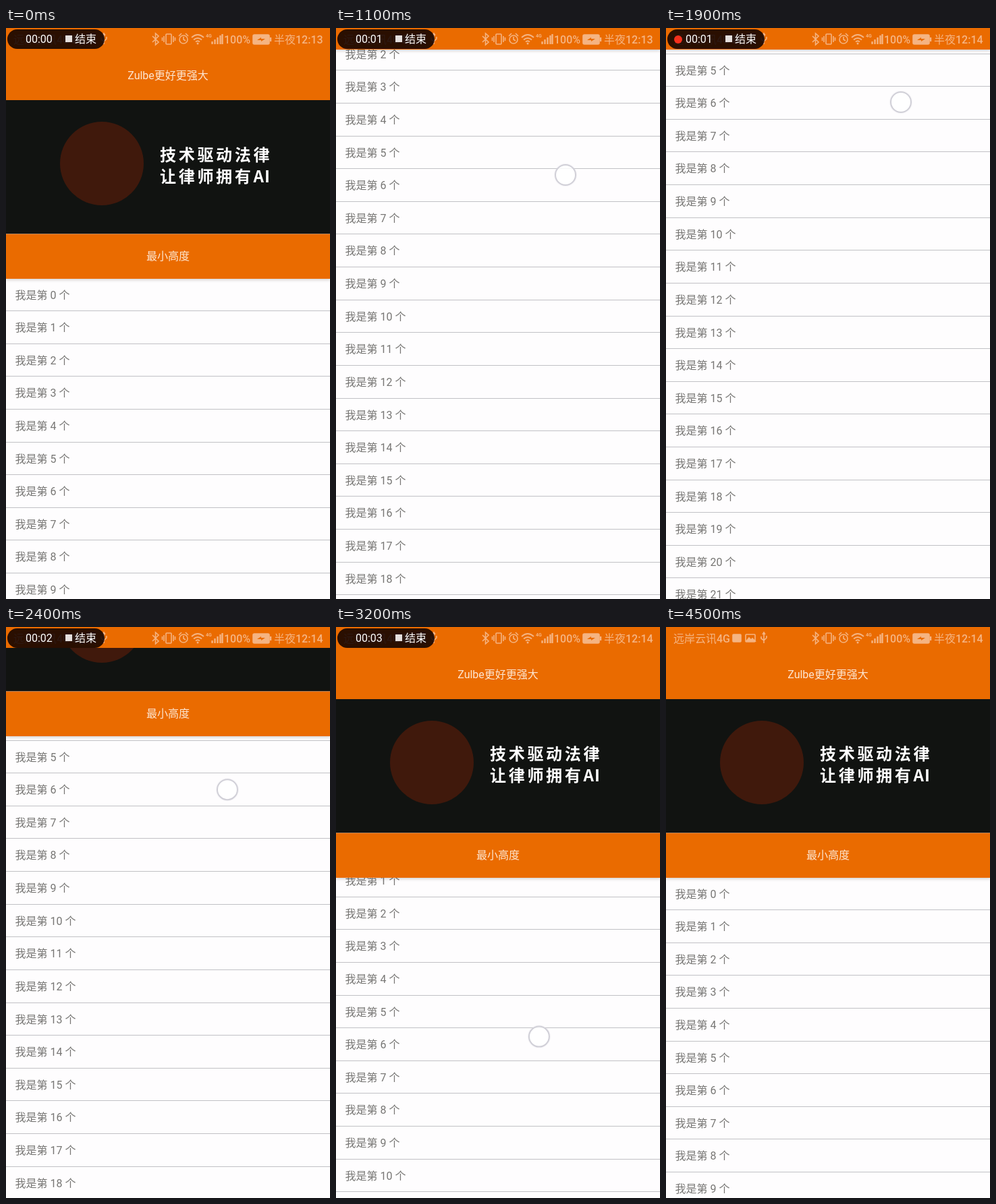
Animation of 480x847 px, one loop 4.6 s. Source, as an HTML page:

```html
<!DOCTYPE html>
<html lang="zh-CN">
<head>
<meta charset="utf-8">
<title>Scrolling header</title>
<style>
  html, body { margin: 0; width: 100%; height: 100%; overflow: hidden; background: #fefdfe; }
  body { font: 16px Roboto, "Noto Sans CJK SC", "Noto Sans CJK", sans-serif; }
  #stage { position: relative; width: 480px; height: 847px; overflow: hidden; background: #fefdfe; }
  #stage > * { position: absolute; left: 0; top: 0; }

  #list { top: 371.6px; width: 480px; }
  .row {
    box-sizing: border-box; height: 48.62px; padding-left: 13.5px;
    border-bottom: 1px solid #c1c1c5; color: #777674; line-height: 50px; white-space: pre;
  }

  #header { width: 480px; height: 372px; background: #ea6b00; box-shadow: 0 2px 4px rgba(0, 0, 0, .17); }
  .label { position: absolute; width: 100%; text-align: center; line-height: 24px; color: #fde6d2; }
  .banner { position: absolute; top: 107px; width: 100%; height: 198px; background: #111311; border-bottom: 1px solid #b9835a; }
  .disc { position: absolute; left: 80px; top: 32px; width: 124px; height: 124px; border-radius: 50%; background: #40190c; }
  .slogan {
    position: absolute; left: 228px; top: 64px; white-space: pre; color: #fff;
    font: 700 24px/31.5px "Noto Sans CJK SC", "Noto Sans CJK", sans-serif; letter-spacing: 3.7px;
  }
  .slogan span { letter-spacing: 1px; }

  #status { width: 480px; height: 31px; background: #ea6b00; color: #f5b482; }
  #status text { font-size: 16px; font-weight: 500; fill: currentColor; }
  #status .tiny { font-size: 7px; font-weight: 700; }

  #pill {
    left: 2px; top: 2px; width: 144px; height: 29px; border-radius: 15px;
    background: rgba(14, 2, 2, .87); color: #fff; line-height: 30px;
  }
  #pill * { position: absolute; white-space: nowrap; }
  #dot { left: 10px; top: 9px; width: 12px; height: 12px; border-radius: 50%; background: #f5301c; }
  #timer { left: 27px; }
  #stop { left: 86px; top: 9px; width: 10px; height: 10px; background: #e4dfdd; }
  #end { left: 100px; }

  #touch {
    box-sizing: border-box; width: 32px; height: 32px; margin: -16px; border-radius: 50%;
    border: 2px solid #d0cfd7; background: rgba(255, 255, 255, .85); box-shadow: 0 0 2px #dddce2;
  }
</style>
</head>
<body>
<div id="stage">
  <div id="list"></div>
  <div id="header">
    <div class="label" style="top:58.5px">Zulbe更好更强大</div>
    <div class="banner">
      <div class="disc"></div>
      <div class="slogan">技术驱动法律
让律师拥有<span>AI</span></div>
    </div>
    <div class="label" style="top:327px">最小高度</div>
  </div>
  <div id="status">
    <svg width="480" height="31" fill="none" stroke="currentColor" stroke-width="1.6">
      <g stroke="none">
        <text x="11" y="22.5">远岸云讯4G</text>
        <text class="tiny" x="296" y="14">4G</text>
        <text x="323" y="23">100%</text>
        <text id="clock" x="397" y="22.5"></text>
      </g>
      <rect x="99" y="11" width="12" height="11" rx="1" fill="currentColor"/>
      <rect x="118" y="11" width="14" height="11" rx="1"/>
      <path d="M119 21l4-5 3 3 2-2 4 4z" fill="currentColor"/>
      <path d="M145 9v15M141 14v3l4 3 4-4v-3M143 11l2-3 2 3"/>
      <path d="M217 12l9 9-4.500 4V8l4.500 4-9 9"/>
      <rect x="237" y="9" width="8" height="15" rx="1"/>
      <path d="M234 12v9M248 12v9M231.500 14v5M250.500 14v5"/>
      <circle cx="263" cy="17" r="6"/>
      <path d="M263 13v4l3 2M256 12l4-4M270 12l-4-4"/>
      <path d="M275 14q9-8 18 0M278 17.500q6-5 12 0M281 20.500q3-2.500 6 0" stroke-width="2"/>
      <circle cx="284" cy="23" r="1.500" fill="currentColor" stroke="none"/>
      <path d="M305.500 24v-4M309.500 24v-7M313.500 24v-10M317.500 24v-13M320.500 24V9" stroke-width="2.400"/>
      <rect x="366" y="10" width="24" height="14" rx="2" fill="currentColor"/>
      <path d="M392 14v6" stroke-width="2.500"/>
      <path d="M372 18l6-4v2h6l-6 4v-2z" fill="#ea6b00" stroke="none"/>
    </svg>
  </div>
  <div id="pill">
    <i id="dot"></i><span id="timer"></span><i id="stop"></i><span id="end">结束</span>
  </div>
  <div id="touch"></div>
</div>
<script>
  const LOOP = 4600, STEP = 100;
  const HIDE = 340;        // distance the header can travel
  const DEPTH = 576;       // deepest total scroll
  const TURN = 1900;       // the drag reverses here
  const $ = id => document.getElementById(id);

  $('list').innerHTML = Array.from({ length: 30 },
    (_, i) => `<div class="row">我是第 ${i} 个</div>`).join('');

  // Monotone cubic curve through [time, value] points.
  function curve(points) {
    const slope = i => (points[i + 1][1] - points[i][1]) / (points[i + 1][0] - points[i][0]);
    const last = points.length - 1;
    const tangent = points.map((_, i) => {
      if (i === 0 || i === last) return 0;
      const a = slope(i - 1), b = slope(i);
      return a * b > 0 ? 2 * a * b / (a + b) : 0;
    });
    return t => {
      if (t <= points[0][0]) return points[0][1];
      if (t >= points[last][0]) return points[last][1];
      const i = points.findIndex(p => p[0] > t) - 1;
      const [t0, v0] = points[i], [t1, v1] = points[i + 1];
      const d = t1 - t0, u = (t - t0) / d, w = 1 - u;
      return v0 * (1 + 2 * u) * w * w + v1 * u * u * (3 - 2 * u)
        + d * u * w * (tangent[i] * w - tangent[i + 1] * u);
    };
  }

  const scroll = curve([[250, 0], [600, -129], [1100, -454], [1500, -560], [TURN, -DEPTH], [2800, -274], [3450, 0]]);
  const fingerX = curve([[200, 270], [600, 283], [1100, 340], [TURN, 348], [2800, 309], [3700, 296]]);
  const fingerY = curve([[200, 688], [600, 547], [1100, 218], [1500, 122], [TURN, 110], [2800, 415], [3450, 692], [3700, 717]]);

  const move = (id, x, y) => { $(id).style.transform = `translate(${x}px, ${y}px)`; };
  const show = (id, on) => { $(id).style.visibility = on ? 'visible' : 'hidden'; };

  function draw(t) {
    const total = Math.round(scroll(t));
    // The header leaves first, and on the way back returns first.
    const header = t < TURN ? Math.max(-HIDE, total) : Math.min(0, total + DEPTH - HIDE);
    move('header', 0, header);
    move('list', 0, total);

    move('touch', fingerX(t), fingerY(t));
    show('touch', t >= 200 && t < 3900);

    const recording = t < 4300;
    show('pill', recording);
    show('dot', recording && t % 1000 >= 500);
    $('timer').textContent = '00:0' + Math.floor(t / 1000);
    $('clock').textContent = t < 1500 ? '半夜12:13' : '半夜12:14';
  }

  const start = performance.now();
  function tick() {
    const t = (performance.now() - start) % LOOP;
    draw(Math.floor(t / STEP) * STEP);
    requestAnimationFrame(tick);
  }
  tick();
</script>
</body>
</html>
```
